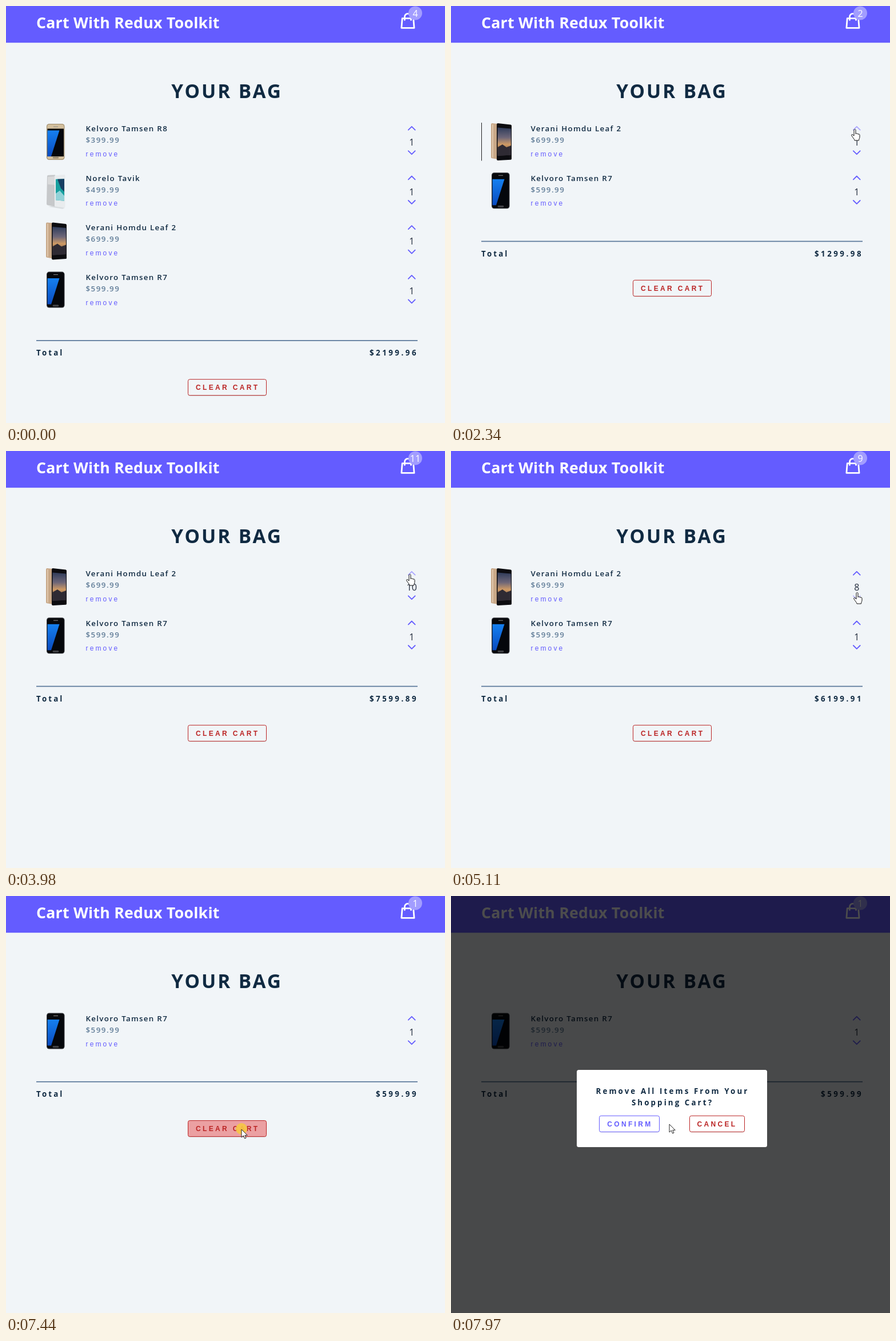
Animation, 768 px wide and 729 px high, one loop 8 s. Source, as an HTML page:

```html
<!DOCTYPE html>
<html lang="en">
<head>
<meta charset="utf-8">
<title>Cart</title>
<style>
html, body { margin: 0; width: 100%; height: 100%; overflow: hidden; background: #f1f5f8; }
svg { display: block; }
text { font-family: "Open Sans", "Noto Sans", sans-serif; fill: #102a42; white-space: pre; }
.title { font-size: 26.67px; font-weight: 700; letter-spacing: .26px; fill: #fff; }
.head { font-size: 33.33px; font-weight: 700; letter-spacing: 3px; }
.name { font-size: 13.33px; font-weight: 600; letter-spacing: 1.3px; }
.price { font-size: 13.33px; font-weight: 600; letter-spacing: 1.5px; fill: #617d98; }
.remove { font: 12px "Liberation Sans", Arial, sans-serif; letter-spacing: 3.15px; fill: #645cff; }
.qty { font-size: 16px; text-anchor: middle; fill: #222b3c; }
.badge { font-size: 16px; text-anchor: middle; fill: #fff; }
.bold { font-size: 13.33px; font-weight: 700; letter-spacing: 3.1px; }
.sum { letter-spacing: 3.5px; text-anchor: end; }
.mid { text-anchor: middle; }
.btn text { font: bold 12px "Liberation Sans", Arial, sans-serif; letter-spacing: 3.33px; }
.btn rect { stroke-width: 1; }
.chev { fill: none; stroke: #645cff; stroke-width: 1.8; stroke-linecap: round; stroke-linejoin: round; }
</style>
</head>
<body>
<svg id="stage" width="768" height="729" viewBox="0 0 768 729"></svg>
<script>
const LOOP = 8000, PITCH = 86.7;
const RED = '#bb2525', VIOLET = '#645cff';

const slab = (frame, edge) => `
  <rect x="71" y="204.5" width="31.5" height="63" rx="4.5" fill="${frame}"/>
  <rect x="72" y="205.5" width="29.5" height="61" rx="4" fill="${edge}"/>
  <rect x="72.5" y="213" width="28.5" height="48.5" fill="#05070c"/>
  <path d="M72.5 216H93.5L79 261.5H72.5Z" fill="url(#blue)"/>
  <path d="M83 209.500h8" stroke="#8b8b8b"/>
  <rect x="82" y="262.600" width="10" height="2.200" rx="1.100" fill="${frame}" stroke="#777" stroke-width=".4"/>`;

const pale = `
  <path d="M84 262L103 266L99 268L74 264Z" fill="#d9dde0"/>
  <path d="M72 211Q72 209 74 209L86 208.5V264L73 261.5Q71 261 71 259Z" fill="#c6c8ca"/>
  <path d="M73 212L85 211V226L73 225Z" fill="#d9dadb"/>
  <path d="M86 209.500L101.500 208Q103.500 208 103.500 210V264Q103.500 266 101 265.700L85 263.500V210.500Z" fill="#e9ecee"/>
  <path d="M87 216L102 215.500V254L87 252.500Z" fill="#18a09f"/>
  <path d="M90 216L102 215.500V238L96 232Z" fill="#173f63"/>
  <path d="M87 241L94 236L102 245V254L87 252.500Z" fill="#93d2d8"/>`;

const gold = `
  <path d="M72 205L82 206V268L71 266Q70 266 70 264V207Q70 205 72 205Z" fill="#c8a888"/>
  <path d="M72 207L74 207V265L72 264.500Z" fill="#dfc6ab"/>
  <path d="M82 205L104.500 207.500Q106 208 106 209.500V267Q106 268.500 104.500 268.700L82 270Q80 270 80 268V207Q80 205 82 205Z" fill="#0c0c10"/>
  <path d="M81.500 212.500L105 214.500V260.500L81.500 262Z" fill="url(#dusk)"/>
  <path d="M81.500 247L90 242L97 247L105 244V260.500L81.500 262Z" fill="#2e2a33"/>`;

const items = [
  { name: 'Kelvoro Tamsen R8', price: 399.99, art: `<g transform="translate(0 1.5)">${slab('#9d8a6a', '#d3bf9d')}</g>`, gone: 1000 },
  { name: 'Norelo Tavik', price: 499.99, art: pale, gone: 1940 },
  { name: 'Verani Homdu Leaf 2', price: 699.99, art: gold, gone: 6500 },
  { name: 'Kelvoro Tamsen R7', price: 599.99, art: slab('#3b3d42', '#08090c'), gone: Infinity }
];

// [time, quantity] of the third product
const counts = [[0, 1]];
for (let n = 2; n <= 8; n++) counts.push([2540 + (n - 2) * 126.6, n]);
counts.push([3440, 9], [3580, 10], [4850, 9], [5110, 8], [5250, 7], [5340, 6],
  [5430, 5], [5510, 4], [5780, 3], [5910, 2], [6110, 1]);

// [time, x, y] of the pointer tip
const path = [[130, 757, 670], [400, 752, 450], [600, 738, 255], [680, 722, 224], [790, 713.5, 250],
  [2000, 713.5, 250], [2300, 706.5, 215], [4040, 706.5, 215], [4180, 713, 227], [4380, 710.5, 247],
  [6700, 710.5, 247], [6900, 680, 275], [7150, 530, 360], [7300, 430, 402], [7370, 412, 408],
  [7590, 412, 408], [7720, 420, 392], [7800, 412, 377], [7970, 382, 399]];

const clicks = [[930, 1000], [1870, 1940], [6430, 6500], [7370, 7500]];

const button = (id, x, y, w, label, tx, color) => `
  <g class="btn" id="${id}">
    <rect x="${x}" y="${y + 1.2}" width="${w}" height="28" rx="3" fill="#000" opacity=".12"/>
    <rect x="${x}" y="${y}" width="${w}" height="28" rx="3" fill="${id === 'clear' ? '#f1f5f8' : '#fff'}"/>
    <rect class="tint" x="${x}" y="${y}" width="${w}" height="28" rx="3" fill="#eba0a2" opacity="0"/>
    <rect x="${x}" y="${y}" width="${w}" height="28" rx="3" fill="none" stroke="${color}"/>
    <text x="${tx}" y="${y + 18.3}" style="fill:${color}">${label}</text>
  </g>`;

const row = p => `
  <g class="row">${p.art}
    <text class="name" x="139.500" y="219">${p.name}</text>
    <text class="price" x="139.500" y="239">$${p.price}</text>
    <text class="remove" x="139.500" y="262.500">remove</text>
    <path class="chev up" d="M703.900 216.700l5.900-5.900 5.900 5.900"/>
    <text class="qty" x="709.800" y="244">1</text>
    <path class="chev down" d="M703.900 253.300l5.900 5.900 5.900-5.900"/>
  </g>`;

const stage = document.getElementById('stage');
stage.innerHTML = `
  <defs>
    <linearGradient id="blue" x1="0" y1="0" x2="0" y2="1">
      <stop offset="0" stop-color="#1580f0"/><stop offset="1" stop-color="#0a4bc0"/>
    </linearGradient>
    <linearGradient id="dusk" x1="0" y1="0" x2="0" y2="1">
      <stop offset="0" stop-color="#2f3c5a"/><stop offset=".35" stop-color="#6d6678"/>
      <stop offset=".6" stop-color="#cf9a64"/><stop offset="1" stop-color="#3a3038"/>
    </linearGradient>
  </defs>
  <rect width="768" height="729" fill="#f1f5f8"/>
  <rect width="768" height="64.200" fill="${VIOLET}"/>
  <text class="title" x="53" y="39">Cart With Redux Toolkit</text>
  <path transform="translate(686.300 9.200) scale(1.389)" d="M16 11V7a4 4 0 00-8 0v4M5 9h14l1 12H4L5 9z"
    fill="none" stroke="#fff" stroke-width="2" stroke-linecap="round" stroke-linejoin="round"/>
  <circle cx="716" cy="12.500" r="12" fill="#a29dff"/>
  <text class="badge" id="badge" x="716" y="18.700"></text>
  <text class="head" x="289.300" y="161">YOUR BAG</text>
  <path id="edge" d="M53.500 204V270.500" stroke="#222"/>
  ${items.map(row).join('')}
  <g id="foot">
    <rect x="53" y="584" width="667" height="1.700" fill="#587699"/>
    <text class="bold" x="53" y="611">Total</text>
    <text class="bold sum" id="total" x="721" y="611"></text>
    ${button('clear', 318.5, 652.7, 137, 'CLEAR CART', 332, RED)}
  </g>
  <g id="modal">
    <rect width="768" height="729" opacity=".7"/>
    <rect x="220" y="304" width="333" height="135" rx="3.500" fill="#fff"/>
    <text class="bold mid" x="387.500" y="346">Remove All Items From Your</text>
    <text class="bold mid" x="387.500" y="366">Shopping Cart?</text>
    ${button('confirm', 259.5, 384.3, 105, 'CONFIRM', 273.3, VIOLET)}
    ${button('cancel', 417.5, 384.3, 96, 'CANCEL', 430.5, RED)}
  </g>
  <g id="pointer">
    <circle id="spot" cy="-1" r="10" fill="#f6c744" opacity=".9"/>
    <path id="arrow" d="M0 0V14L3.400 10.900 5.600 16 8 15 5.800 10.300H10.200Z" fill="#fff" stroke="#111" stroke-width=".9"/>
    <path id="hand" transform="translate(-6.500 .5)" fill="#fff" stroke="#111" stroke-linejoin="round"
      d="M5 1.500c0-2 3-2 3 0V8c0-1.200 2.500-1.200 2.500.4c.2-1.100 2.400-.9 2.400.7c.2-1 2.100-.8 2.100.8V13.500c0 2-1.500 3.500-1.500 6H6c0-2-2-3.500-3.200-5.500L.8 11c-.8-1.600 1-2.600 2.200-1.400L5 11.500Z"/>
  </g>`;

const el = id => document.getElementById(id);
const show = (node, on) => { node.style.display = on ? '' : 'none'; };
const rows = [...stage.querySelectorAll('.row')];
const tint = id => stage.querySelector(`#${id} .tint`);
const clamp = v => Math.max(0, Math.min(1, v));

function tipAt(t) {
  let i = 0;
  while (i < path.length - 2 && t >= path[i + 1][0]) i++;
  const [t0, x0, y0] = path[i], [t1, x1, y1] = path[i + 1];
  const k = clamp((t - t0) / (t1 - t0));
  return [x0 + (x1 - x0) * k, y0 + (y1 - y0) * k];
}

function draw(t) {
  const removed = items.filter(p => t >= p.gone).length;
  const many = counts.filter(c => c[0] <= t).pop()[1];
  const [x, y] = tipAt(t);
  const near = t >= 130 && Math.abs(x - 710) < 10;
  const overUp = near && y > 204 && y < 224;
  const overDown = near && y > 244 && y < 266;

  let pieces = 0, total = 0;
  rows.forEach((g, i) => {
    const here = i >= removed;
    show(g, here);
    if (!here) return;
    const n = i === 2 ? many : 1;
    pieces += n;
    total += n * items[i].price;
    g.setAttribute('transform', `translate(0 ${(i - removed) * PITCH})`);
    g.querySelector('.qty').textContent = n;
    g.querySelector('.up').style.stroke = i === removed && overUp ? '#aaa5ff' : VIOLET;
    g.querySelector('.down').style.stroke = i === removed && overDown ? '#b9b5ff' : VIOLET;
  });
  el('badge').textContent = pieces;
  el('total').textContent = '$' + total.toFixed(2);
  el('foot').setAttribute('transform', `translate(0 ${-removed * PITCH})`);
  show(el('edge'), t >= 1000 && t < 2540);

  tint('clear').setAttribute('opacity', clamp((t - 7270) / 150));
  const modal = t >= 7500;
  show(el('modal'), modal);
  tint('cancel').setAttribute('opacity', modal && x > 417 && y > 384 ? .5 : 0);

  show(el('pointer'), t >= 130);
  el('pointer').setAttribute('transform', `translate(${x} ${y})`);
  show(el('hand'), overUp || overDown);
  show(el('arrow'), !(overUp || overDown));
  show(el('spot'), clicks.some(([a, b]) => t >= a && t < b));
}

const start = performance.now();
function tick() {
  draw((performance.now() - start) % LOOP);
  requestAnimationFrame(tick);
}
tick();
</script>
</body>
</html>
```
